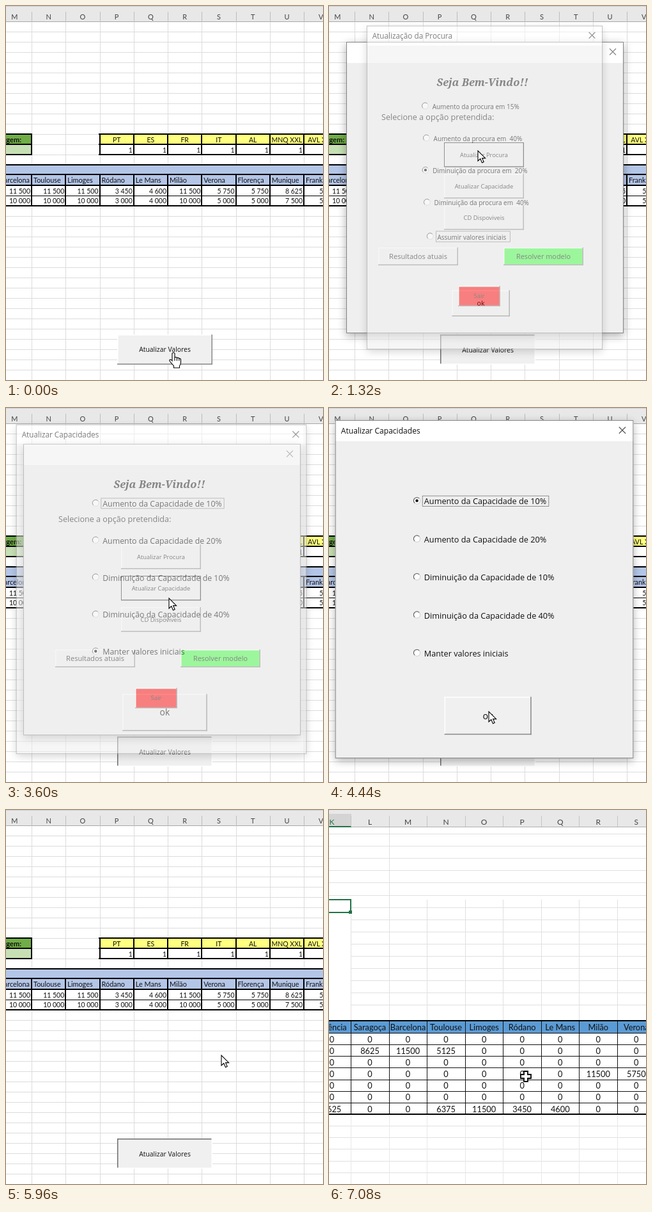
These frames come from a looping animation (496 by 584 pixels, 7.12 s). An HTML page with a canvas:

```html
<!DOCTYPE html>
<html lang="pt">
<head>
<meta charset="utf-8">
<title>Atualizar Valores</title>
<style>
html, body { margin: 0; width: 100%; height: 100%; overflow: hidden; background: #fff; }
canvas { display: block; width: 496px; height: 584px; }
</style>
</head>
<body>
<canvas id="stage" width="496" height="584"></canvas>
<script>
const W = 496, H = 584, LOOP = 7120;
const CELL = 'Lato, "Open Sans", sans-serif';
const FORM = '"Open Sans", "Noto Sans", sans-serif';
const SCRIPT = '"Noto Serif", "Liberation Serif", serif';
const stage = document.getElementById('stage').getContext('2d');
const layerCanvas = document.createElement('canvas');
layerCanvas.width = W;
layerCanvas.height = H;
const layer = layerCanvas.getContext('2d');
let g = stage;

// ---------- helpers ----------
function box(x, y, w, h, color) {
  g.fillStyle = color;
  g.fillRect(x, y, w, h);
}
function frame(x, y, w, h, color, width = 1, dash = []) {
  g.strokeStyle = color;
  g.lineWidth = width;
  g.setLineDash(dash);
  g.strokeRect(x, y, w, h);
  g.setLineDash([]);
}
function hline(y, x1, x2, color, h = 1) { box(x1, Math.round(y), x2 - x1, h, color); }
function vline(x, y1, y2, color, w = 1) { box(Math.round(x), y1, w, y2 - y1, color); }

// y is the middle of the capitals
function text(s, x, y, size, { font = FORM, align = 'left', color = '#111', style = '' } = {}) {
  g.font = `${style} ${size}px ${font}`;
  g.textAlign = align;
  g.fillStyle = color;
  g.fillText(s, x, y + size * 0.36);
}
function cross(x, y, color) {
  g.strokeStyle = color;
  g.lineWidth = 1.2;
  g.beginPath();
  g.moveTo(x - 5, y - 5); g.lineTo(x + 5, y + 5);
  g.moveTo(x + 5, y - 5); g.lineTo(x - 5, y + 5);
  g.stroke();
}
function button(x, y, w, h, label, size, { fill = '#f0f0f0', focus = false, sunken = false } = {}) {
  box(x, y, w, h, fill);
  const light = sunken ? '#6d6d6d' : '#fff', dark = sunken ? '#fff' : '#888';
  box(x, y, w, 1.5, light);
  box(x, y, 1.5, h, light);
  box(x, y + h - 1.5, w, 1.5, dark);
  box(x + w - 1.5, y, 1.5, h, dark);
  if (focus) frame(x + .5, y + .5, w - 1, h - 1, '#222');
  text(label, x + w / 2, y + h / 2 + (sunken ? 1 : 0), size, { align: 'center' });
}
function radio(x, y, on) {
  g.beginPath();
  g.arc(x, y, 5, 0, 7);
  g.fillStyle = '#fff';
  g.fill();
  g.lineWidth = 1;
  g.strokeStyle = '#d0d0d0';
  g.stroke();
  g.beginPath();
  g.arc(x, y, 5, Math.PI * .75, Math.PI * 1.75);
  g.strokeStyle = '#555';
  g.stroke();
  if (!on) return;
  g.beginPath();
  g.arc(x, y, 2.2, 0, 7);
  g.fillStyle = '#111';
  g.fill();
}
function windowBox(x, y, w, h, bar, closeColor, body = '#efefef') {
  g.save();
  g.shadowColor = 'rgba(0,0,0,.32)';
  g.shadowBlur = 13;
  g.shadowOffsetY = 4;
  box(x, y, w, h, body);
  g.restore();
  box(x, y, w, bar, '#fff');
  frame(x + .5, y + .5, w - 1, h - 1, '#858585');
  cross(x + w - 17, y + 15.5, closeColor);
}

// ---------- sheets ----------
const PITCH = 53.25, COL0 = -13.2;
const colX = i => COL0 + i * PITCH;

function planSheet(pressed) {
  box(0, 0, W, H, '#fff');
  for (let y = 40; y < H; y += 16) hline(y, 0, W, '#dcdcdc');
  for (let i = 1; i < 10; i++) vline(colX(i), 25, H, '#dcdcdc');
  box(0, 0, W, 25, '#e8e8e8');
  hline(0, 0, W, '#cfcfcf');
  hline(24, 0, W, '#a8a8a8');
  [...'MNOPQRSTUV'].forEach((c, i) => {
    vline(colX(i), 9, 25, '#bdbdbd');
    text(c, colX(i + .5), 17, 11, { font: CELL, align: 'center', color: '#444' });
  });

  box(0, 200, 40, 16, '#70ad47');
  box(0, 216, 40, 16, '#c6e0b4');
  text('Margem:', 24, 209, 11, { font: CELL, align: 'right', style: 'bold' });
  for (const y of [199, 215, 231]) hline(y, 0, 41, '#000', 2);
  vline(39, 199, 233, '#000', 2);

  box(146, 200, 350, 16, '#ffff80');
  ['PT', 'ES', 'FR', 'IT', 'AL', 'MNQ XXL', 'AVL XXL'].forEach((s, i) => {
    text(s, colX(i + 3.5), 209, 10.5, { font: CELL, align: 'center' });
    text('1', colX(i + 4) - 2, 225, 10.5, { font: CELL, align: 'right' });
    vline(colX(i + 3) - 1, 199, 233, '#000', 2);
  });
  for (const y of [199, 215, 231]) hline(y, 145, W, '#000', 2);

  box(0, 248, W, 32, '#b4c6e7');
  box(0, 280, W, 32, '#fff');
  const demand = ['11 500', '11 500', '11 500', '3 450', '4 600', '11 500', '5 750', '5 750', '8 625', '5 750'];
  const supply = ['10 000', '10 000', '10 000', '3 000', '4 000', '10 000', '5 000', '5 000', '7 500', '5 000'];
  ['Barcelona', 'Toulouse', 'Limoges', 'Ródano', 'Le Mans', 'Milão', 'Verona', 'Florença', 'Munique', 'Frankfurt']
    .forEach((s, i) => {
      text(s, colX(i) + 3, 272.5, 10.9, { font: CELL });
      text(demand[i], colX(i + 1) - 2, 289, 10.5, { font: CELL, align: 'right' });
      text(supply[i], colX(i + 1) - 2, 304.5, 10.5, { font: CELL, align: 'right' });
      vline(colX(i) - 1, 263, 312, '#000', 2);
    });
  for (const [y, h] of [[247, 2], [262, 2], [279, 2], [296, 1], [311, 2]]) hline(y, 0, W, '#000', h);

  button(174, 513, 149, 47, 'Atualizar Valores', 10.4, { sunken: pressed });
}

function resultSheet() {
  const col = i => 34.2 + (i - 1) * 59.55;
  box(0, 0, W, H, '#fff');
  for (let y = 37; y < 320; y += 19.1) hline(y, y < 135 ? 0 : 35, W, '#e0e0e0');
  for (let y = 493; y < H; y += 18.2) hline(y, 0, W, '#e0e0e0');
  for (let i = 1; i < 9; i++) {
    vline(col(i), i === 2 ? 26 : 140, 329, '#e0e0e0');
    vline(col(i), 476, H, '#e8e8e8');
  }
  box(0, 0, W, 26, '#e8e8e8');
  box(0, 6, 35, 20, '#d4d4d4');
  hline(26, 0, W, '#b0b0b0');
  hline(25, 0, 35, '#217346', 2);
  [...'KLMNOPQRS'].forEach((c, i) => {
    vline(col(i), 9, 26, '#c4c4c4');
    text(c, col(i + .5), 19, 12, { font: CELL, align: 'center', color: i ? '#444' : '#217346' });
  });
  hline(139, 0, 35, '#217346', 2);
  hline(159, 0, 31, '#217346', 2);
  vline(33, 139, 157, '#217346', 2);
  box(31, 157, 5, 5, '#217346');

  box(0, 329, W, 19, '#5b9bd5');
  const filled = {
    1: [0, 8625, 11500, 5125],
    3: [0, 0, 0, 0, 0, 0, 0, 11500, 5750],
    6: [5625, 0, 0, 6375, 11500, 3450, 4600]
  };
  ['Valência', 'Saragoça', 'Barcelona', 'Toulouse', 'Limoges', 'Ródano', 'Le Mans', 'Milão', 'Verona']
    .forEach((s, i) => {
      text(s, col(i + .5), 339, 12.8, { font: CELL, align: 'center' });
      for (let r = 0; r < 7; r++)
        text(String((filled[r] || [])[i] || 0), col(i + .5), 358 + r * 18.15, 12.8, { font: CELL, align: 'center' });
      vline(col(i), 329, 475, '#111');
    });
  for (let r = 0; r < 7; r++) hline(348 + r * 18.15, 0, W, '#111');
  hline(328, 0, W, '#000', 2);
  hline(474, 0, W, '#000', 2);
}

// ---------- dialogs ----------
function welcome(t) {
  const focus = t < 3500 ? 0 : t < 4870 ? 1 : 2;
  windowBox(27, 56, 434, 455, 33, '#888');
  text('Seja Bem-Vindo!!', 240, 119, 16.5, { font: SCRIPT, align: 'center', style: 'italic bold' });
  text('Selecione a opção pretendida:', 82, 173, 12.6);
  ['Atualizar Procura', 'Atualizar Capacidade', 'CD Dispoviveis'].forEach((s, i) =>
    button(180, 213 + i * 49, 125, 38.5, s, 9.4, { focus: focus === i && i < 2 }));
  button(77, 377, 125, 28, 'Resultados atuais', 11.1);
  button(273, 377, 125, 28, 'Resolver modelo', 10.9, { fill: '#40ff40', focus: focus === 2 });
  button(202, 437, 66, 32, 'Sair', 9.6, { fill: '#ff0000' });
}

function demandForm(t) {
  const picked = t >= 2200;
  windowBox(54, 24, 379, 519, 32, '#222');
  text('Atualização da Procura', 63, 40.5, 12.1);
  [['Aumento da procura em 15%', 148, 152.5], ['Aumento da procura em  40%', 150, 204],
   ['Diminuição da procura em  20%', 148.5, 255.5], ['Diminuição da procura em  40%', 151, 307],
   ['Assumir valores iniciais', 156, 361.5]].forEach(([s, x, y], i) => {
    radio(x, y, i === (picked ? 0 : 2));
    text(s, x + 11.5, y + 1.5, 10.25);
  });
  if (picked) frame(157.5, 145.5, 146, 16, '#333', 1, [1, 1]);
  else frame(165.5, 353.5, 119, 17, '#333', 1, [1, 1]);
  button(191, 448, 93, 42, 'ok', 11);
}

function capacityForm(t) {
  windowBox(15, 25, 456, 516, 32, '#444');
  text('Atualizar Capacidades', 24, 41.5, 11.8);
  ['Aumento da Capacidade de 10%', 'Aumento da Capacidade de 20%', 'Diminuição da Capacidade de 10%',
   'Diminuição da Capacidade de 40%', 'Manter valores iniciais'].forEach((s, i) => {
    const y = 148 + i * 58;
    radio(140, y, i === (t < 4060 ? 4 : 0));
    text(s, 151, y + 1, 12.4);
  });
  frame(148.5, 140.5, 193, 16, '#333', 1, [1, 1]);
  button(182, 447, 133, 58, 'ok', 14);
}

function notice() {
  windowBox(78, 228, 346, 176, 30, '#333', '#fff');
  box(79, 361, 344, 42, '#f0f0f0');
  text('Quadrivel Folha', 88, 244.5, 11.8);
  text('As condições para a resolução do modelo estão reúnidas', 91, 291, 10.9);
  text('Esta Operação pode demorar alguns minutos', 100, 304, 10.9);
  text('Até já!', 189, 330, 10.9);
  box(328, 371, 78, 20, '#e1e1e1');
  frame(329, 372, 76, 18, '#0078d7', 2);
  text('OK', 367, 381, 10.9, { align: 'center' });
}

function question() {
  windowBox(36, 124, 416, 319, 32, '#444');
  text('Os valores foram atualizados.', 95, 185.5, 17.8);
  text('Deseja consultar os novos resultados?', 95, 208.5, 17.8);
  button(113, 334, 110, 42, 'Não', 9.6, { fill: '#ff1010' });
  button(282, 334, 109, 42, 'Sim', 9.6, { fill: '#10ff10', focus: true });
  frame(284, 336, 105, 38, '#e8f5e8', 2);
  frame(286.5, 338.5, 100, 33, '#186018', 1, [1, 1]);
}

// draw, opening, closing, centre, size at rest
const DIALOGS = [
  [welcome, 320, 5480, 244, 283, 1],
  [demandForm, 1235, 2840, 243.5, 283.5, 1],
  [capacityForm, 3515, 4490, 243, 283, 1.0235],
  [notice, 4890, 5218, 251, 316, 1.028],
  [question, 5960, 6428, 244, 283.5, 1]
];
const OPEN_MS = 160, CLOSE_MS = 120, SHEET_SWITCH = 6560;
const clamp = v => Math.min(1, Math.max(0, v));

function showDialog([draw, opens, closes, cx, cy, rest], t) {
  if (t <= opens || t >= closes + CLOSE_MS) return;
  const rise = clamp((t - opens) / OPEN_MS), fall = clamp((t - closes) / CLOSE_MS);
  const scale = rest * (0.945 + 0.055 * rise) * (1 - 0.032 * fall);
  g = layer;
  g.setTransform(1, 0, 0, 1, 0, 0);
  g.clearRect(0, 0, W, H);
  g.setTransform(scale, 0, 0, scale, cx * (1 - scale), cy * (1 - scale));
  draw(t);
  g = stage;
  g.globalAlpha = rise * (1 - fall);
  g.drawImage(layerCanvas, 0, 0);
  g.globalAlpha = 1;
}

// ---------- pointer ----------
const PATH = [
  [0, 260, 541], [440, 260, 541], [1040, 233, 226], [1420, 233, 226],
  [2080, 267, 162], [2440, 267, 162], [2760, 238, 468], [2900, 238, 468],
  [3400, 255, 297], [3640, 255, 297], [3980, 240, 150], [4120, 240, 150],
  [4400, 250, 474], [4560, 250, 474], [4840, 337, 383], [5960, 337, 383],
  [6240, 341, 374], [6380, 341, 374], [6440, 341, 386], [6600, 341, 388],
  [7040, 308, 416], [LOOP, 308, 416]
];
function pointerAt(t) {
  const i = PATH.findIndex(k => k[0] > t);
  const [t0, x0, y0] = PATH[i - 1], [t1, x1, y1] = PATH[i];
  const p = (t - t0) / (t1 - t0), e = p * p * (3 - 2 * p);
  return [x0 + (x1 - x0) * e, y0 + (y1 - y0) * e];
}
const ARROW = new Path2D('M0 0V16L3.8 12.5L6.5 18.7L9.2 17.5L6.6 11.6H11.6Z');
const HAND = new Path2D('M0 1.5Q2 -1 4 1.5V8Q6 6.5 7.5 8.5Q9.5 7.5 10.8 9.5Q13 9 13.5 11V16Q13 19 11.5 21V24H2.5V21L-3.5 14Q-5 11.5-3 11Q-1.5 11 0 13Z');
const PLUS = new Path2D('M-3 -8H3V-3H8V3H3V8H-3V3H-8V-3H-3Z');

function pointer(t) {
  const [x, y] = pointerAt(t);
  const shape = t < 340 ? HAND : t < SHEET_SWITCH ? ARROW : PLUS;
  g.save();
  g.translate(Math.round(x), Math.round(y));
  g.fillStyle = '#fff';
  g.strokeStyle = '#000';
  g.lineWidth = shape === PLUS ? 1.8 : 1.1;
  g.fill(shape);
  g.stroke(shape);
  if (shape === HAND) {
    g.beginPath();
    for (const fx of [4, 7.5, 10.8]) { g.moveTo(fx, 8.5); g.lineTo(fx, 13); }
    g.stroke();
  }
  g.restore();
}

function render(t) {
  if (t < SHEET_SWITCH) planSheet(t >= 200);
  else resultSheet();
  DIALOGS.forEach(d => showDialog(d, t));
  pointer(t);
}

const start = performance.now();
function tick() {
  const t = (performance.now() - start) % LOOP;
  render(Math.floor(t / 40) * 40);
  requestAnimationFrame(tick);
}
tick();
</script>
</body>
</html>
```
